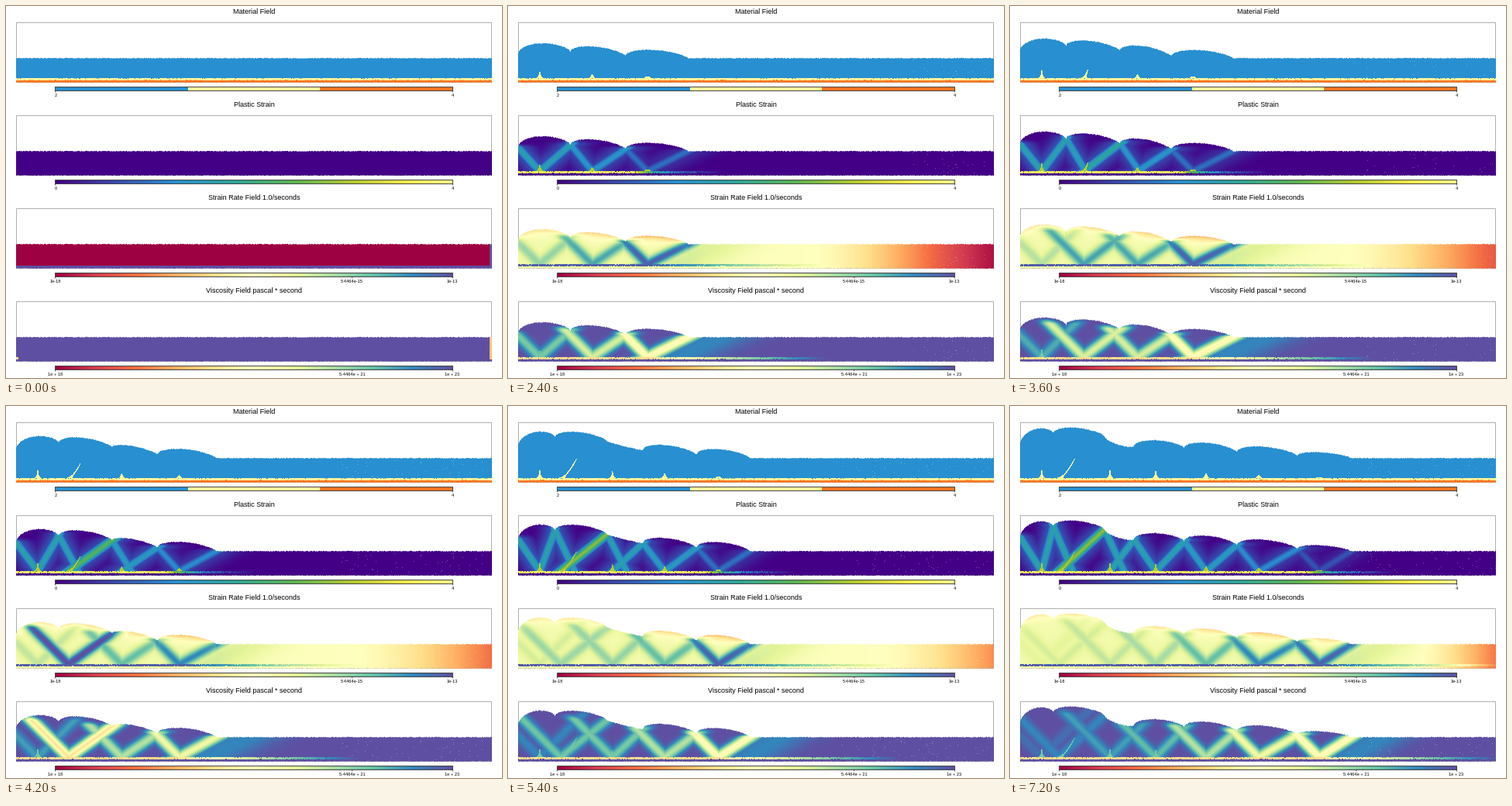
These frames come from a looping animation (640x480 px, 7800 ms). A matplotlib script:

```python
import numpy as np
import matplotlib.pyplot as plt
from matplotlib.animation import FuncAnimation
from matplotlib.colors import LinearSegmentedColormap, ListedColormap
from matplotlib.patches import Rectangle

W, H, DPI = 640, 480, 100
FRAMES, STEP = 13, 600
LEFT, RIGHT, TOP, BOTTOM = 13, 627, 22, 100
FLAT, BASE = 67.3, 93.2
PANEL_GAP = 120

plt.rcParams["font.family"] = "Liberation Sans"

# Block boundaries: last position, distance travelled, final uplift
EDGE_END = [13, 56, 122, 160, 225, 293, 371, 440]
EDGE_DRIFT = [0, 33, 40, 96, 125, 130, 130, 130]
EDGE_RISE = [18, 32, 28, 15, 13, 8, 3, 0]
# Step at which each block starts to fold
BORN = [-3, 0, 2, 4, 7, 9, 10.7]
BLOCKS = len(BORN)
THRUST = 1          # the block whose fault takes over half way
ROOT_OFFSET = 28

MATERIAL = ListedColormap(["#288fd0", "#fff799", "#ff7520"])
PLASTIC = LinearSegmentedColormap.from_list("plastic", [
    (0, "#430086"), (0.12, "#3a3aa5"), (0.3, "#288fd0"), (0.45, "#2ca59a"),
    (0.6, "#5cb352"), (0.75, "#b5c92f"), (0.88, "#f2e84a"), (1, "#ffff8c")])
SPECTRAL = plt.get_cmap("Spectral")

X, Y = np.meshgrid(np.arange(LEFT, RIGHT) + 0.5, np.arange(TOP, BOTTOM) + 0.5)
COLS = X[0]


def smooth(u):
    u = np.clip(u, 0, 1)
    return u * u * (3 - 2 * u)


def ramp(age, span):
    return float(np.clip(age / span, 0, 1))


def hump(u):
    return u ** 0.5 * (1 - u) ** 0.7 / 0.443


def edge(i, k):
    """Position and surface height of a block boundary."""
    x = EDGE_END[i] + EDGE_DRIFT[i] * np.cos(np.pi * k / 24) ** 2
    start = BORN[i] if i < BLOCKS else FRAMES
    start = max(start, 0)
    return x, FLAT - EDGE_RISE[i] * smooth((k - start) / max(12 - start, 1))


def slip(k):
    return smooth((k - 5) / 3)


def root(j, k):
    """Foot of the fault pair below block j."""
    slides = j in (THRUST, THRUST + 1)
    return edge(j, k)[0] + ROOT_OFFSET - 21 * slides * slip(k)


def surface(k):
    """Surface height and crest weight for every column."""
    top = np.full(COLS.size, FLAT)
    crest = np.zeros(COLS.size)
    for j, born in enumerate(BORN):
        (a, ya), (b, yb) = edge(j, k), edge(j + 1, k)
        grown = ramp(k - born, 2) * ramp(k, 2)
        # Narrow blocks are squeezed until they sag.
        height = 13 if j == 0 else 9 * np.clip((b - a - 48) / 17, -0.5, 1)
        inside = (COLS >= a) & (COLS < b)
        dome = hump((COLS[inside] - a) / (b - a))
        top[inside] = np.interp(COLS[inside], [a, b], [ya, yb]) - height * grown * dome
        fresh = 0.12 + 0.2 * np.exp(-max(k - born, 0) / 4)
        crest[inside] = fresh * grown * np.sqrt(dome) * (height > 0)
    return top, crest


def band(x0, x1, y1, width):
    """Soft straight band rising from the weak layer to (x1, y1)."""
    rise = BASE - y1
    v = (BASE - Y) / rise
    dist = (X - x0 - (x1 - x0) * v) / np.hypot(1, (x1 - x0) / rise)
    ends = np.clip((1.2 - v) * 6, 0, 1) * (Y < BASE + 0.5)
    return np.exp(-(dist / width) ** 2) * ends


def spikes(k):
    mask = np.zeros(X.shape, bool)
    up = np.maximum(BASE - Y, 0)
    for j, born in enumerate(BORN):
        pushed = slip(k) * (j == THRUST)
        height = min(1.3 * max(k - born, 0), 12) * ramp(k, 2) + 14 * pushed
        if height < 0.5:
            continue
        v = np.clip(up / height, 0, 1)
        half = (0.9 + 4 * np.exp(-up / 2)) * np.minimum(1, 0.3 + 2 * (1 - v))
        center = root(j, k) + 21 * pushed * v ** 0.65
        mask |= (np.abs(X - center) < half) & (up < height)
    return mask & (Y < BASE)


def shear(k):
    """Accumulated strain and current activity along the zigzag of bands."""
    strain, rate = np.zeros(X.shape), np.zeros(X.shape)
    for j, born in enumerate(BORN):
        age = k - born
        if age <= 0 or k == 0:
            continue
        foot = root(j, k)
        amount = 0.43 * (1 - np.exp(-age / 2.5)) * ramp(k, 2)
        active = 0.42 * ramp(age, 1.3) * np.exp(-max(age - 2, 0) / 6)
        if j == THRUST:
            active += 0.3 * np.exp(-((k - 7.3) / 1.2) ** 2)
        for side in (-1, 1):
            x1, y1 = edge(j if side < 0 else j + 1, k)
            old_foot = max(foot, x1 + 25) if side < 0 else foot
            boost = 0.25 * slip(k) * (j == THRUST and side > 0)
            strain = np.maximum(strain, (amount + boost) * band(old_foot, x1, y1, 6))
            strain = np.maximum(strain, 0.45 * amount * band(old_foot, x1, y1, 16))
            # Active bands never get steeper than 45 degrees.
            reach = side * max(side * (x1 - foot), BASE - y1)
            rate = np.maximum(rate, active * band(foot, foot + reach, y1, 7.5))
    return strain, rate


def fields(k):
    rng = np.random.default_rng(40 + k)

    def jitter(size):
        return rng.uniform(-size, size, COLS.size)

    top, crest = surface(k)
    strain, rate = shear(k)
    spike = spikes(k)
    upper, lower = BASE + jitter(0.4), 95.8 + jitter(0.4)
    strip = (Y >= upper) & (Y < lower)
    grain = rng.uniform(-0.1, 0.1, X.shape)

    newest = max(j for j, born in enumerate(BORN) if k - born > 0.5 or j == 0)
    front, toe = root(newest, k), edge(newest + 1, k)[0]
    ahead = np.exp(-np.maximum(X - toe, 0) / 60)
    if k:
        rate = np.maximum(rate, 0.08 * band(front + 38, toe + 40, FLAT, 22))

    material = np.where(Y >= lower, 2, np.where(strip | spike, 1, 0))

    layer = np.interp(X, [front - 20, front + 5, front + 40, front + 100],
                      [0.92, 0.5, 0.2, 0])
    plastic = np.where(spike, np.maximum(0.75, strain), strain)
    plastic = np.where(strip, layer + grain * (layer > 0.1), plastic)
    plastic = np.where(Y >= lower, 0, plastic) * (k > 0)

    fade_start, fade_width = 200 + 90 * np.sqrt(k), 335 - 5 * (k - 7) ** 2
    flow = (0.5 + 0.05 * ahead) * (1 - smooth((X - fade_start) / fade_width))
    drive = np.clip(1 - (X - front) / 235, 0, 1)
    speed = flow - crest * np.exp(-np.maximum(Y - top, 0) / 6) + rate
    speed = np.where(strip, flow + (0.97 - flow + 0.3 * grain) * drive, speed)
    viscosity = np.where(spike & (rate < 0.2), 0.78, 1 - 1.25 * rate)
    viscosity = np.where(strip, 1 - (0.6 - 0.6 * grain) * drive, viscosity)
    viscosity = np.where(Y >= lower, 1, viscosity)
    if k == 0:
        # Only the floor and the right wall move at the start.
        wall = X > RIGHT - 3
        speed = np.where((Y >= upper + 1.8) | wall, 1.0, 0.0)
        viscosity = np.where(wall & (Y < 96), 0.35, 1.0)
        viscosity[(X < 16) & (np.abs(Y - 94.5) < 1.3)] = 0.4

    cover = np.clip(Y + 0.5 - top - jitter(0.5), 0, 1)
    cover *= np.clip(98.6 + jitter(0.4) - Y + 0.5, 0, 1)
    specks = (rng.random(X.shape) < 0.008) & (X > max(640 - 30 * k, 430))
    return (material / 2, plastic, speed, viscosity), cover * (1 - 0.3 * specks)


PANELS = [
    ("Material Field", MATERIAL, [(0, "2"), (1, "4")]),
    ("Plastic Strain", PLASTIC, [(0, "0"), (1, "4")]),
    ("Strain Rate Field 1.0/seconds", SPECTRAL,
     [(0, "1e-18"), (0.747, "5.4464e-15"), (1, "1e-13")]),
    ("Viscosity Field pascal * second", SPECTRAL,
     [(0, "1e + 18"), (0.747, "5.4464e + 21"), (1, "1e + 23")]),
]

fig = plt.figure(figsize=(W / DPI, H / DPI), dpi=DPI, facecolor="white")
ax = fig.add_axes([0, 0, 1, 1])
PX = 72 / DPI


def frame_box(x, y, w, h, color, zorder):
    ax.add_patch(Rectangle((x, y), w, h, fill=False, ec=color, lw=0.9 * PX,
                           snap=False, zorder=zorder))


def add_panel(index, title, cmap, ticks):
    y = index * PANEL_GAP
    ax.text(320, y + 10, title, size=9 * PX, ha="center", va="baseline")
    frame_box(13.5, y + 21.5, 613, 77, "#a8a8a8", 1)
    image = ax.imshow(np.zeros(X.shape + (4,)), interpolation="nearest", zorder=2,
                      extent=(LEFT, RIGHT, y + BOTTOM, y + TOP), aspect="auto")
    ax.imshow(np.linspace(0, 1, 512)[None, :], cmap=cmap, aspect="auto",
              interpolation="nearest", extent=(64, 576, y + 109, y + 105), zorder=2)
    frame_box(63.5, y + 104.5, 513, 5, "#333333", 3)
    for at, label in ticks:
        x = 63.5 + 513 * at
        ax.plot([x, x], [y + 109.5, y + 111], color="#333333", lw=0.8 * PX,
                snap=False, zorder=3)
        ax.text(64 + 512 * at, y + 117, label, size=5.7 * PX,
                ha="center", va="baseline")
    return image


images = [add_panel(i, *panel) for i, panel in enumerate(PANELS)]
ax.set_xlim(0, W)
ax.set_ylim(H, 0)
ax.axis("off")


def draw(k):
    values, cover = fields(k)
    for image, value, (_, cmap, _) in zip(images, values, PANELS):
        rgba = cmap(np.clip(value, 0, 1).astype(float))
        rgba[..., 3] = cover
        image.set_data(rgba)
    return images


anim = FuncAnimation(fig, draw, frames=FRAMES, interval=STEP, repeat=True,
                     repeat_delay=0, blit=False)
plt.show()
```
